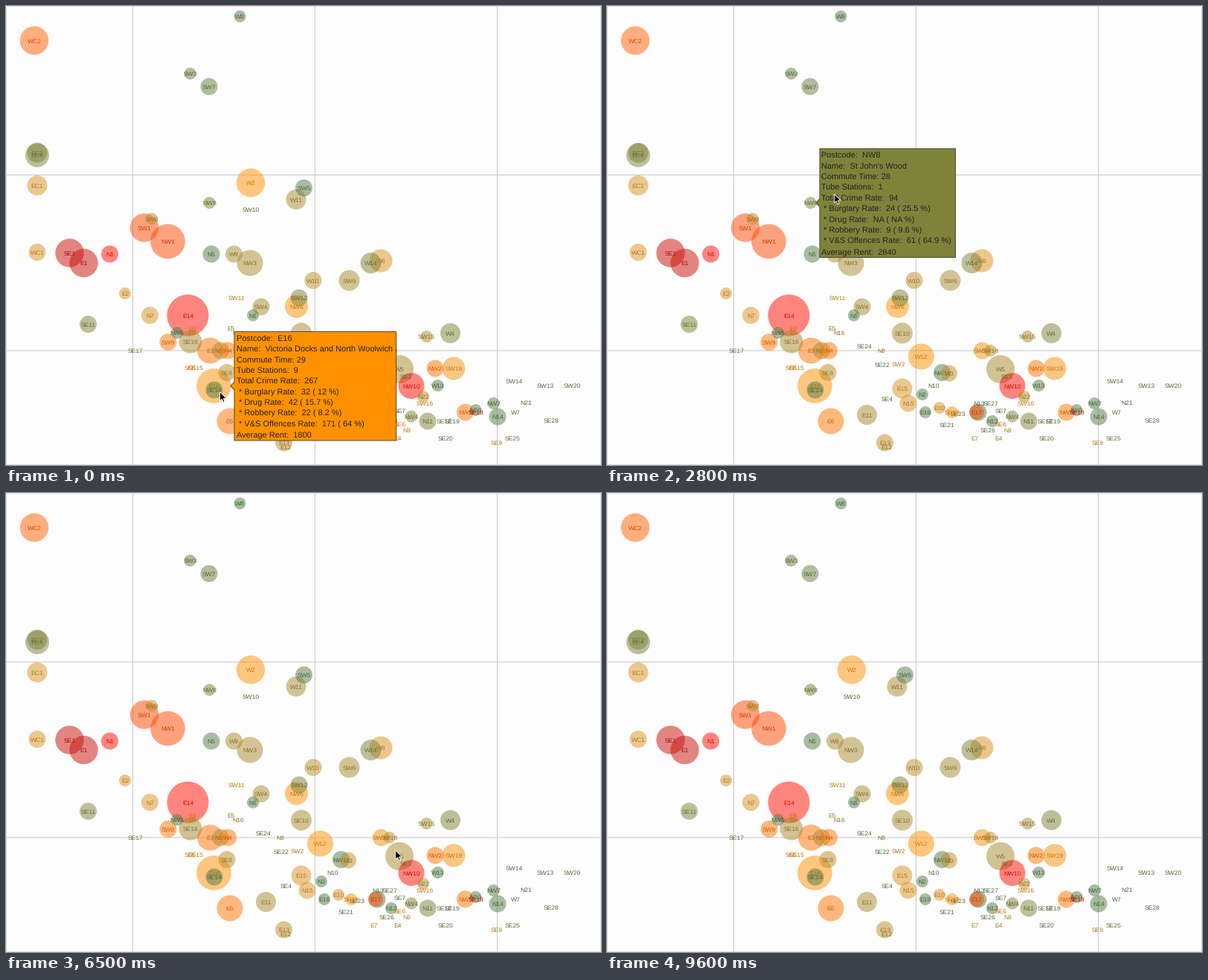
Write a matplotlib script that moves like this. It is 800x618 px and loops after 9700 ms.

```python
import numpy as np
import matplotlib.pyplot as plt
from matplotlib.animation import FuncAnimation
from matplotlib.patches import Circle, Polygon

W, H, DPI = 800, 618, 100
FRAMES, STEP = 97, 100
PX = 72 / DPI

plt.rcParams["font.family"] = ["Liberation Sans", "DejaVu Sans"]
plt.rcParams["text.hinting"] = "none"

# Colour scale of the crime rate: green, ochre, orange, red, dark red
STOPS = [0, 0.8, 1, 2, 3]
RAMP = np.array([(85, 124, 70), (219, 147, 32), (255, 145, 0),
                 (255, 0, 0), (165, 25, 10)]) / 255

# Scale position -> (label, x, y[, radius])
AREAS = {
    0.0: [("W8", 314.5, 14, 8), ("N5", 276, 334, 11.5), ("SW5", 400.5, 245, 11.5),
          ("N6", 332, 416.5, 8), ("NW5", 230, 440, 8), ("N2", 424, 523, 8),
          ("E18", 428, 547, 8), ("N20", 631.5, 544, 8), ("NW7", 655.5, 535, 8),
          ("N14", 661, 553, 11.5), ("NW11", 450.5, 493.5, 11.5),
          ("N12", 518, 559, 8), ("W13", 580.5, 511, 8), ("", 499, 547, 11.5),
          ("SE14", 280, 517, 11.5), ("N21", 699, 534)],
    0.1: [("SW3", 247.5, 91, 8), ("SW7", 273, 108.5, 11.5), ("SW10", 329, 274),
          ("SE24", 346.5, 457.5), ("SE22", 370.5, 483), ("N10", 439, 511),
          ("SE4", 377, 529), ("SE21", 457.5, 564), ("SE23", 472, 549),
          ("N13", 500, 534.5), ("SE27", 516.5, 534.5), ("SE7", 530, 545),
          ("SE26", 512, 570.5), ("SE20", 591, 582), ("SE12", 589.5, 558.5),
          ("SE19", 600.5, 558.5), ("W7", 685, 546.5), ("SW14", 683.5, 505),
          ("SW13", 725, 511), ("SW20", 761.5, 511), ("SE28", 733.5, 558)],
    0.25: [("EC4", 42, 201, 16), ("EC2", 42, 197.5, 13.5), ("NW8", 273.5, 265, 8),
           ("SE11", 110.5, 428.5, 11.5), ("W4", 597.5, 440.5, 13.5),
           ("N11", 567, 559, 11.5), ("NW4", 545, 552.5, 8), ("W14", 490.5, 346, 14),
           ("SW12", 394, 393, 11.5), ("SE17", 174, 463.5), ("SE25", 681, 582),
           ("SE3", 538, 499)],
    0.5: [("W11", 390, 260.5, 13.5), ("W9", 306.5, 334, 11.5), ("NW3", 328, 346, 17.5),
          ("SW4", 343, 405, 11.5), ("W5", 529, 489, 19), ("SE10", 397, 440.5, 14),
          ("SW6", 461.5, 369.5, 14), ("SW15", 565.5, 445, 8),
          ("SE16", 248, 452, 15.5), ("E11", 349.5, 550.5, 13.5),
          ("N19", 288.5, 464, 11.5), ("N16", 312.5, 440), ("N8", 369, 463.5),
          ("E12", 376, 594)],
    0.63: [("W10", 413, 369.5, 11.5), ("SE8", 297, 493.5, 11.5),
           ("E13", 373.5, 588, 11.5), ("SW8", 196, 286.5, 8), ("N22", 561, 526, 8),
           ("SW18", 515.5, 464, 8), ("W3", 460, 494.5, 11), ("E5", 302.5, 434),
           ("E4", 527, 582)],
    0.8: [("EC1", 42, 241.5, 13.5), ("WC1", 42, 331.5, 11.5), ("E2", 160, 387, 8),
          ("N7", 193.5, 416.5, 11.5), ("W6", 504, 343, 15.5),
          ("E15", 397, 515, 13.5), ("N15", 405, 535, 11.5), ("E10", 447, 541, 8),
          ("SW2", 392, 481.5), ("N9", 539, 570.5), ("E7", 494, 582), ("SE9", 660, 588)],
    0.93: [("SW19", 602, 488, 15.5), ("SW17", 504.5, 464, 11.5), ("SE6", 530, 563),
           ("SE5", 248, 487), ("SE15", 255.5, 487), ("SW16", 563, 534.5),
           ("SW11", 310, 392.5), ("E8", 251, 434), ("E9", 250.5, 440)],
    1.0: [("W2", 329, 238, 19.2), ("NW6", 390.5, 404.5, 15.5),
          ("W12", 422.5, 472, 17.5), ("E16", 279.5, 511.5, 23.3),
          ("SE13", 464, 547, 8)],
    1.2: [("NW2", 577, 488, 11.5), ("NW9", 617.5, 547, 11.5), ("E3", 274.5, 464, 17.5),
          ("N4", 298.5, 464, 11.5), ("SW9", 218, 452.5, 11.5), ("E6", 301, 559, 17.5)],
    1.35: [("WC2", 38, 46.5, 19.2)],
    1.5: [("SW1", 186, 298.5, 19.2), ("NW1", 217.5, 317, 23.3), ("E17", 497, 547, 10)],
    1.9: [("E14", 244.5, 416.5, 28), ("N1", 139.5, 334, 11.5),
          ("NW10", 545, 511.5, 17.5), ("SE18", 632, 547)],
    2.6: [("SE1", 85.5, 332.5, 19.2), ("E1", 104.5, 346, 19.2)],
}

# Start and end in ms, scale position, pointer tip, then the values shown
TIPS = [
    (0, 900, 1.0, (302, 511.5), "E16", "Victoria Docks and North Woolwich", 29, 9, 267,
     "32 ( 12 %)", "42 ( 15.7 %)", "22 ( 8.2 %)", "171 ( 64 %)", 1800),
    (1400, 1900, 0.8, (168, 387), "E2", "Bethnal Green", 19, 1, 213,
     "33 ( 15.5 %)", "18 ( 8.5 %)", "26 ( 12.2 %)", "136 ( 63.8 %)", 2325),
    (2500, 3100, 0.25, (281, 265), "NW8", "St John's Wood", 28, 1, 94,
     "24 ( 25.5 %)", "NA ( NA %)", "9 ( 9.6 %)", "61 ( 64.9 %)", 2840),
    (5200, 6000, 0.7, (470, 494.5), "W3", "Acton", 44, 2, 192,
     "21 ( 10.9 %)", "20 ( 10.4 %)", "10 ( 5.2 %)", "141 ( 73.4 %)", 1870),
    (7100, 8000, 0.51, (573, 445), "SW15", "Putney", 52, 1, 149,
     "20 ( 13.4 %)", "9 ( 6 %)", "12 ( 8.1 %)", "108 ( 72.5 %)", 2080),
]
FIELDS = ["Postcode:  ", "Name:  ", "Commute Time: ", "Tube Stations:  ",
          "Total Crime Rate:  ", " * Burglary Rate:  ", " * Drug Rate:  ",
          " * Robbery Rate:  ", " * V&S Offences Rate:  ", "Average Rent:  "]

# Pointer path: time in ms, x, y
PATH = np.array([(0, 287.5, 519.5), (600, 285, 517), (1500, 158, 385),
                 (1700, 146, 362.5), (2500, 275, 266), (2800, 305.5, 253),
                 (4000, 400.5, 364.5), (5300, 459, 492), (5700, 476.5, 521),
                 (7200, 565, 446), (7600, 569, 456.5), (8600, 605, 540),
                 (9300, 640, 630)])
ARROW = np.array([(0, 0), (0, 12.2), (2.8, 9.7), (4.7, 13.9),
                  (6.6, 13), (4.8, 9), (8.6, 8.7)])


def color(t, shade=1.0):
    return tuple(shade * np.interp(t, STOPS, RAMP[:, k]) for k in range(3))


fig = plt.figure(figsize=(W / DPI, H / DPI), dpi=DPI, facecolor="#fdfdfd")
ax = fig.add_axes([0, 0, 1, 1])
ax.set(xlim=(0, W), ylim=(H, 0))
ax.axis("off")


def draw_grid():
    style = dict(lw=PX, zorder=0, snap=False)
    for x in (170.5, 415.5, 660.5):
        ax.plot([x, x], [0, H], color="#c8c8c8", **style)
    for y in (227.5, 464):
        ax.plot([0, W], [y, y], color="#c8c8c8", **style)
    ax.plot([0.5, W - 0.5, W - 0.5, 0.5, 0.5], [0.5, 0.5, H - 0.5, H - 0.5, 0.5],
            color="#dedede", **style)


def draw_areas():
    spots = [(*area, 0)[:4] + (t,) for t, group in AREAS.items() for area in group]
    spots.sort(key=lambda s: -s[3])  # large bubbles lie beneath small ones
    for z, (label, x, y, r, t) in enumerate(spots, 1):
        if r:
            ax.add_patch(Circle((x, y), r, fc=color(t), alpha=0.5, lw=0, zorder=z))
        ax.text(x, y + 3.2, label, color=color(t, 0.82), size=8.5 * PX,
                ha="center", va="baseline", zorder=z)


def make_tip(t, tip, values):
    left, mid = tip[0] + 5, tip[1]
    top, bottom = mid - 73, mid + 73.5
    lines = [ax.text(left + 2.5, top + 13.3 + 14.33 * i, f"{field}{value}",
                     size=11 * PX, color="#222222", va="baseline", zorder=301)
             for i, (field, value) in enumerate(zip(FIELDS, values))]
    right = max(line.get_window_extent().x1 for line in lines) + 5.2
    box = Polygon([(left, top), (right, top), (right, bottom), (left, bottom),
                   (left, mid + 5.5), tip, (left, mid - 5.5)],
                  fc=color(t), ec="#4c4636", lw=PX, zorder=300)
    ax.add_patch(box)
    return [box, *lines]


draw_grid()
draw_areas()
tips = [(start, end, make_tip(t, tip, values))
        for start, end, t, tip, *values in TIPS]
cursor = ax.add_patch(Polygon(ARROW, fc="black", ec="white", lw=0.9 * PX, zorder=400))


def update(i):
    now = i * STEP
    for start, end, parts in tips:
        for part in parts:
            part.set_visible(start <= now < end)
    x, y = (np.interp(now, PATH[:, 0], PATH[:, k]) for k in (1, 2))
    cursor.set_xy(ARROW + (x, y))
    return [cursor]


anim = FuncAnimation(fig, update, frames=FRAMES, interval=STEP,
                     repeat=True, repeat_delay=0)
plt.show()
```
